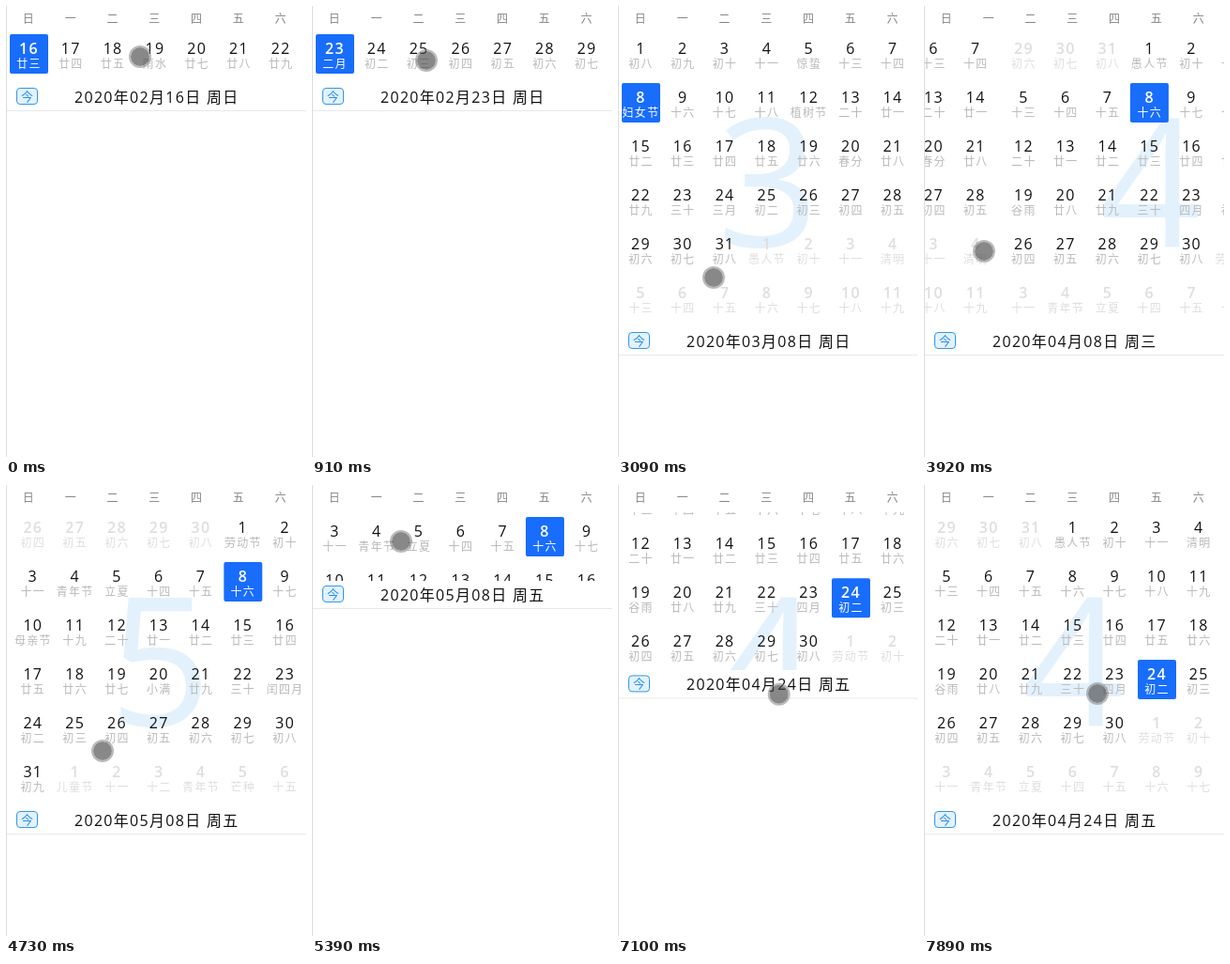
An HTML page that plays this animation: 320 by 480 pixels, repeating every 8 s.

```html
<!DOCTYPE html>
<html lang="zh-CN">
<head>
<meta charset="utf-8">
<title>Calendar</title>
<style>
html, body { margin: 0; width: 100%; height: 100%; overflow: hidden; background: #fff; }
#stage {
  position: relative; width: 320px; height: 480px; overflow: hidden; background: #fff;
  font-family: "Open Sans", "Noto Sans", "Noto Sans CJK SC", "Noto Sans CJK", sans-serif;
  letter-spacing: 1.3px; color: #111; white-space: nowrap;
}
#stage * { position: absolute; box-sizing: border-box; }
#edge { left: 0; top: 0; width: 1px; height: 480px; background: #dcdcdc; }
.cjk, .head, .cell i, #today { font-family: "Noto Sans CJK SC", "Noto Sans CJK", sans-serif; }
.head { top: 4px; width: 41px; text-align: center; font-size: 12px; line-height: 18px; color: #858585; }
#view { left: 0; top: 29px; width: 320px; overflow: hidden; }
.layer { left: 0; top: 0; }
.page { top: 0; width: 320px; height: 312px; }
.rows { left: 0; top: 0; }
.mark {
  left: 0; top: 54px; width: 320px; height: 200px; line-height: 200px;
  font-size: 190px; text-align: center; letter-spacing: 0; color: #e3f1fd;
}
.cell { width: 41px; height: 42px; border-radius: 2px; text-align: center; }
.cell b, .cell i { left: 0; width: 100%; font-style: normal; font-weight: 400; }
.cell b { top: 5px; font-size: 16px; line-height: 20px; }
.cell i { top: 23px; font-size: 12px; line-height: 16px; color: #b9b9b9; }
.cell.out b, .cell.out i { color: #dedede; }
.cell.out b, .cell.on b { font-weight: 600; }
.cell.on { background: #186dfc; }
.cell.on b, .cell.on i { color: #fff; }
#bar { left: 0; top: 82px; width: 320px; height: 30px; background: #fff; border-bottom: 1px solid #e6e9ec; }
#today {
  left: 11px; top: 5px; width: 23px; height: 18px; border: 1px solid #2f97ee; border-radius: 4px;
  background: #e4f2fe; color: #2390ec; font-size: 13px; line-height: 15px; text-align: center; letter-spacing: 0;
}
#date { left: 73px; top: 5px; font-size: 16px; line-height: 20px; }
#dot {
  left: -12px; top: -12px; width: 24px; height: 24px; border-radius: 50%;
  border: 2.5px solid rgba(130, 130, 130, .55); background: rgba(70, 70, 70, .64) padding-box;
}
</style>
</head>
<body>
<div id="stage">
  <div id="view">
    <div id="weeks" class="layer"></div>
    <div id="months" class="layer"></div>
  </div>
  <div id="bar"><div id="today">今</div><div id="date"></div></div>
  <div id="edge"></div>
  <div id="dot"></div>
</div>
<script>
const LOOP = 8000, COL = 44.8, ROW = 52, DAY = 864e5;
const $ = id => document.getElementById(id);
const day = (m, d) => Date.UTC(2020, m - 1, d);
const WEEK = "日一二三四五六";

// Lunar day names, with festivals and solar terms on top
const MOONS = [[1, 25, "正月"], [2, 23, "二月"], [3, 24, "三月"], [4, 23, "四月"], [5, 23, "闰四月"]];
const FEASTS = {
  "2-19": "雨水", "3-5": "惊蛰", "3-8": "妇女节", "3-12": "植树节", "3-20": "春分",
  "4-1": "愚人节", "4-4": "清明", "4-19": "谷雨", "5-1": "劳动节", "5-4": "青年节",
  "5-5": "立夏", "5-10": "母亲节", "5-20": "小满", "6-1": "儿童节", "6-4": "青年节", "6-5": "芒种"
};
function lunar(time) {
  const d = new Date(time);
  const feast = FEASTS[(d.getUTCMonth() + 1) + "-" + d.getUTCDate()];
  if (feast) return feast;
  const moon = MOONS.filter(m => day(m[0], m[1]) <= time).pop();
  const n = (time - day(moon[0], moon[1])) / DAY + 1;
  if (n === 1) return moon[2];
  if (n === 10) return "初十";
  if (n === 20) return "二十";
  if (n === 30) return "三十";
  return "初十廿"[Math.floor(n / 10)] + "一二三四五六七八九"[n % 10 - 1];
}

function add(parent, tag, cls, text) {
  const el = document.createElement(tag);
  if (cls) el.className = cls;
  if (text !== undefined) el.textContent = text;
  parent.appendChild(el);
  return el;
}

const cells = [];
function addCells(box, start, count, month) {
  for (let i = 0; i < count; i++) {
    const time = start + i * DAY, d = new Date(time);
    const out = month && d.getUTCMonth() + 1 !== month;
    const el = add(box, "div", out ? "cell out" : "cell");
    el.style.left = 4 + COL * (i % 7) + "px";
    el.style.top = 1 + ROW * Math.floor(i / 7) + "px";
    add(el, "b", "", d.getUTCDate());
    add(el, "i", "", lunar(time));
    if (!out) cells.push({ el, time });
  }
}
const sunday = time => time - new Date(time).getUTCDay() * DAY;
function addPage(layer, index) {
  const page = add(layer, "div", "page");
  page.style.left = index * 320 + "px";
  return page;
}

[...WEEK].forEach((c, i) => {
  add($("stage"), "div", "head", c).style.left = 4 + COL * i + "px";
});
[[2, 16], [2, 23], [3, 1], [3, 8], [4, 19], [4, 26], [5, 3]].forEach((w, i) =>
  addCells(addPage($("weeks"), i), day(...w), 7));
const rowBoxes = [3, 4, 5].map((m, i) => {
  const page = addPage($("months"), i);
  add(page, "div", "mark", m);
  const rows = add(page, "div", "rows");
  addCells(rows, sunday(day(m, 1)), 42, m);
  return rows;
});

// Keys are [time, values..., ease]; the ease shapes the way to that key
const out = u => 1 - (1 - u) ** 3;
const soft = u => u * u * (3 - 2 * u);
function at(keys, t, size = 1) {
  let i = keys.length - 1;
  while (i > 0 && keys[i][0] > t) i--;
  const a = keys[i], b = keys[i + 1];
  if (!b) return a.slice(1, 1 + size);
  const u = (b[size + 1] || soft)((t - a[0]) / (b[0] - a[0]));
  return a.slice(1, 1 + size).map((v, k) => v + (b[k + 1] - v) * u);
}

const weekPos = [
  [0, 0], [130, 0], [400, .25], [780, 1, out],
  [1180, 1], [1410, 1.33], [1720, 2, out],
  [1850, 2], [2080, 2.35], [2380, 3, out],
  [5000, 3], [5000, 6],
  [5690, 6], [5940, 5.82], [6190, 5, out],
  [6330, 5], [6570, 4.67], [6820, 4, out]
];
const monthPos = [
  [0, 0], [3480, 0], [3870, .5], [4120, 1, out],
  [4320, 1], [4550, 1.38], [4800, 2, out],
  [6000, 2], [6000, 1]
];
const open = [
  [0, 0], [2440, 0], [2900, .88], [3060, 1, out],
  [4850, 1], [5360, .15], [5510, 0, out],
  [6880, 0], [7340, .95], [7480, 1, out]
];
const dotPos = [
  [0, 143, 54], [130, 143, 54], [400, 63, 56], [600, 63, 56], [910, 122, 58], [1180, 122, 58],
  [1410, 12, 60], [1820, 216, 58], [1850, 216, 58], [2080, 104, 60], [2420, 104, 60],
  [2960, 102, 289], [3090, 102, 289], [3430, 232, 280], [3480, 232, 280], [3870, 64, 261],
  [3930, 64, 261], [4270, 225, 285], [4320, 225, 285], [4560, 103, 283], [4800, 103, 283],
  [5360, 95, 60], [5400, 95, 60], [5650, 16, 62], [5690, 16, 62], [5940, 74, 64], [6160, 74, 64],
  [6290, 60, 62], [6330, 60, 62], [6570, 165, 64], [6850, 165, 64],
  [7340, 178, 372], [7600, 178, 256], [7885, 178, 256], [7885, 185, 222]
];
const picks = [
  [0, 2, 16], [400, 2, 23], [1410, 3, 1], [2080, 3, 8],
  [3870, 4, 8], [4550, 5, 8], [5940, 5, 1], [6570, 4, 24]
];

let picked;
function pick(time) {
  if (time === picked) return;
  picked = time;
  const d = new Date(time), two = n => String(n).padStart(2, "0");
  $("date").textContent =
    `2020年${two(d.getUTCMonth() + 1)}月${two(d.getUTCDate())}日 周${WEEK[d.getUTCDay()]}`;
  cells.forEach(c => c.el.classList.toggle("on", c.time === time));
}

const move = (el, x, y) => { el.style.transform = `translate(${x}px, ${y}px)`; };

function draw(now) {
  const t = now % LOOP;
  const p = at(open, t)[0];
  const [, m, d] = picks.filter(k => k[0] <= t).pop();
  pick(day(m, d));

  const full = p > 0;
  $("weeks").style.display = full ? "none" : "block";
  $("months").style.display = full ? "block" : "none";
  move($("weeks"), -320 * at(weekPos, t)[0], 0);
  move($("months"), -320 * at(monthPos, t)[0], 0);

  const row = Math.floor((day(m, d) - sunday(day(m, 1))) / DAY / 7);
  rowBoxes.forEach(box => move(box, 0, -row * ROW * (1 - p)));
  $("view").style.height = ROW * (1 + 5 * p) + 1 + "px";
  move($("bar"), 0, 5 * ROW * p);
  move($("dot"), ...at(dotPos, t, 2));
}

let begin;
function tick(now) {
  if (begin === undefined) begin = now;
  draw(now - begin);
  requestAnimationFrame(tick);
}
draw(0);
requestAnimationFrame(tick);
</script>
</body>
</html>
```
